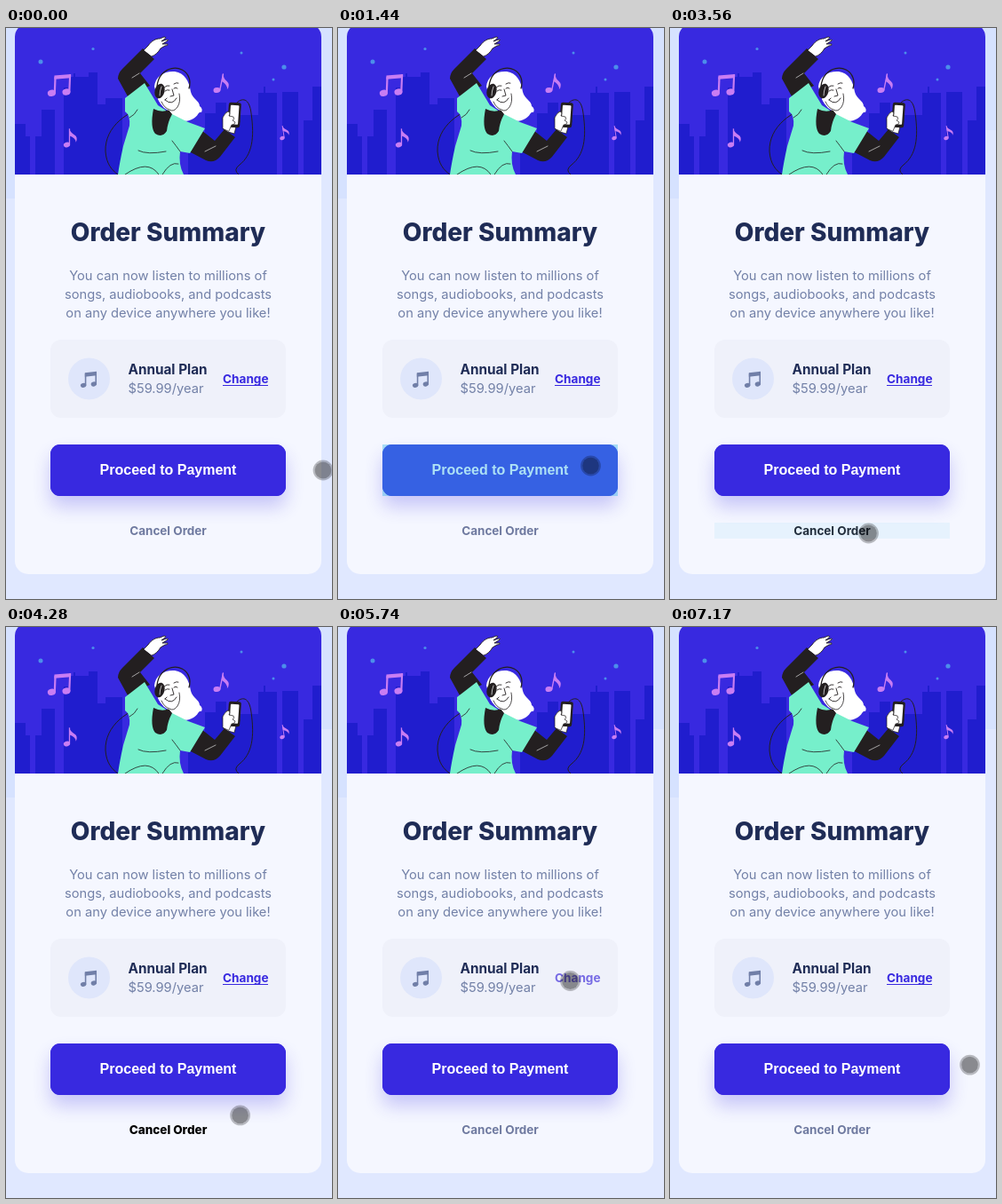
Recreate the animation shown at these times as an HTML page with a canvas. Size 367 by 643 pixels, loop 8100 ms.

```html
<!DOCTYPE html>
<html lang="en">
<head>
<meta charset="utf-8">
<title>Order Summary</title>
<style>
html, body { margin: 0; width: 100%; height: 100%; overflow: hidden; background: #e0e8ff; }
canvas { display: block; width: 367px; height: 643px; }
</style>
</head>
<body>
<canvas id="stage"></canvas>
<script>
const W = 367, H = 643, LOOP = 8100;
const canvas = document.getElementById('stage');
const ctx = canvas.getContext('2d');
const scale = window.devicePixelRatio || 1;
canvas.width = Math.round(W * scale);
canvas.height = Math.round(H * scale);

const NAVY = '#1f2c56', SLATE = '#7280a7', BLUE = '#3829e0', PALE = '#f5f7ff';
const CITY = '#201dce', INK = '#231f20', MINT = '#76efcb', PINK = '#c97df3', SKY = '#4c8eea';
const UI = 'Inter, "Open Sans", sans-serif';
const BUTTON = '"Liberation Sans", Arial, sans-serif';

// Pointer stops: time, x, y
const POINTER = [
  [0, 357, 498], [500, 357, 498], [1010, 297, 493], [1090, 297, 493],
  [1290, 284.5, 493], [2030, 284.5, 493], [2320, 300, 532], [2540, 274.5, 559.5],
  [2890, 223.5, 569], [3850, 223.5, 569], [4280, 263.5, 550], [4520, 284, 490],
  [4730, 278, 428], [5160, 261.5, 398.5], [5880, 261.5, 398.5], [6320, 302, 448],
  [6750, 340, 492], [6810, 337.5, 493], [8100, 337.5, 493.5]
];

const clamp = v => Math.min(1, Math.max(0, v));
const ramp = (t, a, b) => clamp((t - a) / (b - a));
const ease = p => 1 - (1 - p) * (1 - p);
const hex = c => [1, 3, 5].map(i => parseInt(c.slice(i, i + 2), 16));

function mix(a, b, p) {
  const q = hex(b);
  return `rgb(${hex(a).map((v, i) => Math.round(v + (q[i] - v) * p)).join()})`;
}

function slope(i, axis) {
  const a = POINTER[i - 1], b = POINTER[i], c = POINTER[i + 1];
  if (!a || !c) return 0;
  const still = (p, q) => Math.hypot(p[1] - q[1], p[2] - q[2]) < 1;
  if (still(a, b) || still(b, c)) return 0;
  return (c[axis] - a[axis]) / (c[0] - a[0]);
}

function pointerAt(t) {
  let i = 0;
  while (i < POINTER.length - 2 && POINTER[i + 1][0] <= t) i++;
  const a = POINTER[i], b = POINTER[i + 1], d = b[0] - a[0], u = (t - a[0]) / d;
  return [1, 2].map(k =>
    (2 * u ** 3 - 3 * u ** 2 + 1) * a[k] + (u ** 3 - 2 * u ** 2 + u) * d * slope(i, k) +
    (3 * u ** 2 - 2 * u ** 3) * b[k] + (u ** 3 - u ** 2) * d * slope(i + 1, k));
}

// Touch highlight: instant on, short hold, fade out
const tap = (t, start) => t < start ? 0 : 1 - ramp(t, start + 90, start + 260);

function fill(d, color) {
  ctx.fillStyle = color;
  ctx.fill(new Path2D(d));
}

function line(d, color = INK, width = 1) {
  ctx.strokeStyle = color;
  ctx.lineWidth = width;
  ctx.stroke(new Path2D(d));
}

function outlined(d, color, width = 0.9) {
  fill(d, color);
  line(d, INK, width);
}

function oval(x, y, rx, ry, color, turn = 0) {
  ctx.fillStyle = color;
  ctx.beginPath();
  ctx.ellipse(x, y, rx, ry, turn, 0, Math.PI * 2);
  ctx.fill();
}

function box(x, y, w, h, r, color) {
  ctx.fillStyle = color;
  ctx.beginPath();
  ctx.roundRect(x, y, w, h, r);
  ctx.fill();
}

function text(str, x, y, font, color, align = 'left') {
  ctx.font = font;
  ctx.fillStyle = color;
  ctx.textAlign = align;
  ctx.fillText(str, x, y);
}

function highlight(x, y, w, h, strength) {
  if (strength > 0) box(x, y, w, h, 0, `rgba(51,181,229,${0.4 * strength})`);
}

function placed(x, y, size, turn, draw) {
  ctx.save();
  ctx.translate(x, y);
  ctx.rotate(turn);
  ctx.scale(size, size);
  draw();
  ctx.restore();
}

function pairNote(x, y, size, color, beam, turn = 0) {
  placed(x, y, size, turn, () => {
    oval(-6, 7, 3.3, 2.6, color, -0.3);
    oval(6, 5.6, 3.3, 2.6, color, -0.3);
    line('M-3.5 7V-6M8.4 5.5V-8', color, 1.6);
    fill(`M-4.3 -7.4L9.2 -9V${beam - 9}L-4.3 ${beam - 7.4}Z`, color);
  });
}

function flagNote(x, y, size, turn) {
  placed(x, y, size, turn, () => {
    oval(0, 0, 4, 3, PINK, -0.3);
    line('M3.2 -1V-19', PINK, 1.4);
    fill('M2.6 -19.5Q5 -14 9 -12Q14 -9 11 -3Q11 -8 3 -11Z', PINK);
  });
}

function city() {
  fill('M10 165V108H22V122H27V165ZM33 165V122H40V92H55V165Z', CITY);
  fill('M65 165V67H70V55H76V51H78V55H93V50H103V86H112V79H131V165Z', CITY);
  fill('M205 165V128H224V96H236V84H248V112H262V98H284V73H290V66H292V73H305V165Z', CITY);
  fill('M311 165V72H329V165ZM335 165V104H345V66H355V165Z', CITY);
}

function listener() {
  // cord
  line('M166 86C137 92 111 111 112 139C113 153 119 160 126 165');
  line('M258 86C266 77 274 79 276 96C280 124 277 143 263 154Q255 160 262 165');

  // raised arm and hand
  fill('M126 57Q126 51 131 46L154 23L167 35L151 51L162 65L137 77Z', INK);
  outlined('M155 25L160 20C164 14 169 12 173 12L178 10Q181 10 179 12L175 15L181 13Q184 13 181 15L176 18L182 18Q183 20 179 20L174 23Q170 30 164 32Z', '#fff');
  line('M142 56L150 51', '#fff', 0.6);

  // hair behind the face
  fill('M167 66C168 54 179 48 190 49C201 51 206 59 208 72C210 80 218 82 218 88Q222 91 220 95C216 94 217 99 211 102C201 108 189 104 184 95L172 82Z', '#fff');

  // lower arm
  fill('M220 115L235 127L246 114L258 123L241 145Q234 153 225 149L206 139Z', INK);
  line('M224 139L236 133', '#fff', 0.6);

  // shirt
  fill('M156 62L134 79L134 94Q140 98 139 110L132 133Q128 151 126 165H200Q194 154 196 139L207 141L224 113L205 106L185 96L171 87Z', MINT);
  line('M149 138Q159 143 180 139M196 139Q191 132 187 127M139 101Q145 98 148 92', INK, 0.8);
  line('M134 165Q160 147 172 165M176 165Q185 150 194 153', INK, 0.8);

  // collar and face
  fill('M166 91Q176 96 183 92L187 97Q182 106 181 116Q176 124 168 119Q162 112 166 91Z', INK);
  fill('M174 58Q187 49 195 60Q198 70 196 79Q195 91 187 94Q176 92 171 80Z', '#fff');
  line('M195 74Q197 83 193 89Q189 95 184 92Q178 90 175 83', INK, 0.8);
  line('M178 67Q181 64 184 65M189 63Q192 61 194 62M179 71Q181 69 184 70M189 68Q191 66 193 68', INK, 0.9);
  line('M187 69L189 76L185 77M179 81Q187 88 192 79M179 81L181 79', INK, 0.9);

  // headphones
  line('M170 66C172 42 200 39 206 56Q208 61 206 68', INK, 1.3);
  oval(173, 71, 5.5, 8.5, INK, 0.25);
  line('M175 66Q173 71 173 76', '#fff', 0.7);

  // phone and hand
  outlined('M245 114L244 101L249 94L256 98L262 99L263 106L259 111L257 119L250 117Z', '#fff', 0.8);
  placed(257, 98, 1, 0.07, () => {
    box(-7, -14, 14, 28, 2.5, INK);
    box(-4.8, -11, 9.6, 21.5, 1, '#fff');
  });
  outlined('M244 113L244 101Q246 96 250 94Q253 95 251 99L256 100Q258 103 255 104L258 106Q258 109 254 109L251 116Z', '#fff', 0.7);
}

function hero() {
  ctx.save();
  ctx.beginPath();
  ctx.roundRect(10, -5, 345, 170, [15, 15, 0, 0]);
  ctx.clip();
  box(10, -5, 345, 170, 0, BLUE);
  city();
  [[39, 38, 2.5], [98, 23.5, 1.6], [265, 28, 1.5], [313, 44, 2.6], [301, 58, 1.5]]
    .forEach(([x, y, r]) => oval(x, y, r, r, SKY));
  pairNote(60, 64, 1.38, PINK, 3, 0.04);
  flagNote(68.5, 131.5, 0.93, 0);
  flagNote(237.5, 70, 1, 0.2);
  flagNote(311, 124, 0.7, -0.15);
  listener();
  ctx.restore();
}

function backdrop() {
  box(0, 0, W, H, 0, '#e0e8ff');
  fill('M0 0H367V115H355C250 110 120 192 10 192H0Z', '#d6e2ff');
  box(10, -5, 345, 620, 15, PALE);
}

function plan(t) {
  box(50, 351, 265, 88, 12, '#eff1fa');
  oval(93.5, 395, 23.5, 23.5, '#dfe6fb');
  pairNote(93, 395.5, 0.98, '#717fa8', 4.6);
  text('Annual Plan', 137.5, 390, `700 15.3px ${UI}`, NAVY);
  text('$59.99/year', 137.5, 411, `400 14.7px ${UI}`, SLATE);

  const active = t < 7165 ? ease(ramp(t, 5440, 5700)) : 0;
  text('Change', 244, 400, `700 13.6px ${UI}`, mix(BLUE, '#766ae4', active));
  if (active === 0) box(244, 402, 51, 1, 0, BLUE);
  highlight(244, 386, 52, 19, tap(t, 5375));
}

function payButton(t) {
  const hover = ease(ramp(t, 1505, 1720)) - ease(ramp(t, 3400, 3550));
  const face = color => box(50, 469, 265, 58, 11, color);
  ctx.save();
  ctx.globalAlpha = 1 - 0.2 * hover;
  ctx.shadowColor = 'rgba(56,41,224,0.24)';
  ctx.shadowBlur = 20 * scale;
  ctx.shadowOffsetY = 12 * scale;
  face(BLUE);
  ctx.restore();
  // The shadow must not show through the faded face
  face(mix(BLUE, PALE, 0.2 * hover));
  text('Proceed to Payment', 182.5, 503, `700 16px ${BUTTON}`, '#fff', 'center');
  highlight(50, 469, 265, 58, tap(t, 1435));
}

function cancelLink(t) {
  const hover = ease(ramp(t, 3440, 3700)) - ease(ramp(t, 5440, 5690));
  const weight = hover > 0.8 ? 800 : 700;
  text('Cancel Order', 182.5, 571, `${weight} 13.5px ${UI}`, mix('#6f7aa0', '#000000', hover), 'center');
  highlight(50, 557, 265, 18, tap(t, 3335));
}

function pointer(t) {
  const [x, y] = pointerAt(t);
  oval(x, y, 9.4, 9.4, 'rgba(0,0,0,0.44)');
  ctx.strokeStyle = 'rgba(0,0,0,0.25)';
  ctx.lineWidth = 2;
  ctx.beginPath();
  ctx.arc(x, y, 10.4, 0, Math.PI * 2);
  ctx.stroke();
}

function draw(t) {
  ctx.setTransform(scale, 0, 0, scale, 0, 0);
  ctx.lineCap = ctx.lineJoin = 'round';
  backdrop();
  hero();
  text('Order Summary', 182.5, 239.5, `800 28px ${UI}`, NAVY, 'center');
  ['You can now listen to millions of', 'songs, audiobooks, and podcasts', 'on any device anywhere you like!']
    .forEach((row, i) => text(row, 182.5, 284 + 21 * i, `400 14.7px ${UI}`, SLATE, 'center'));
  plan(t);
  payButton(t);
  cancelLink(t);
  pointer(t);
}

function tick() {
  draw(performance.now() % LOOP);
  requestAnimationFrame(tick);
}
tick();
</script>
</body>
</html>
```
